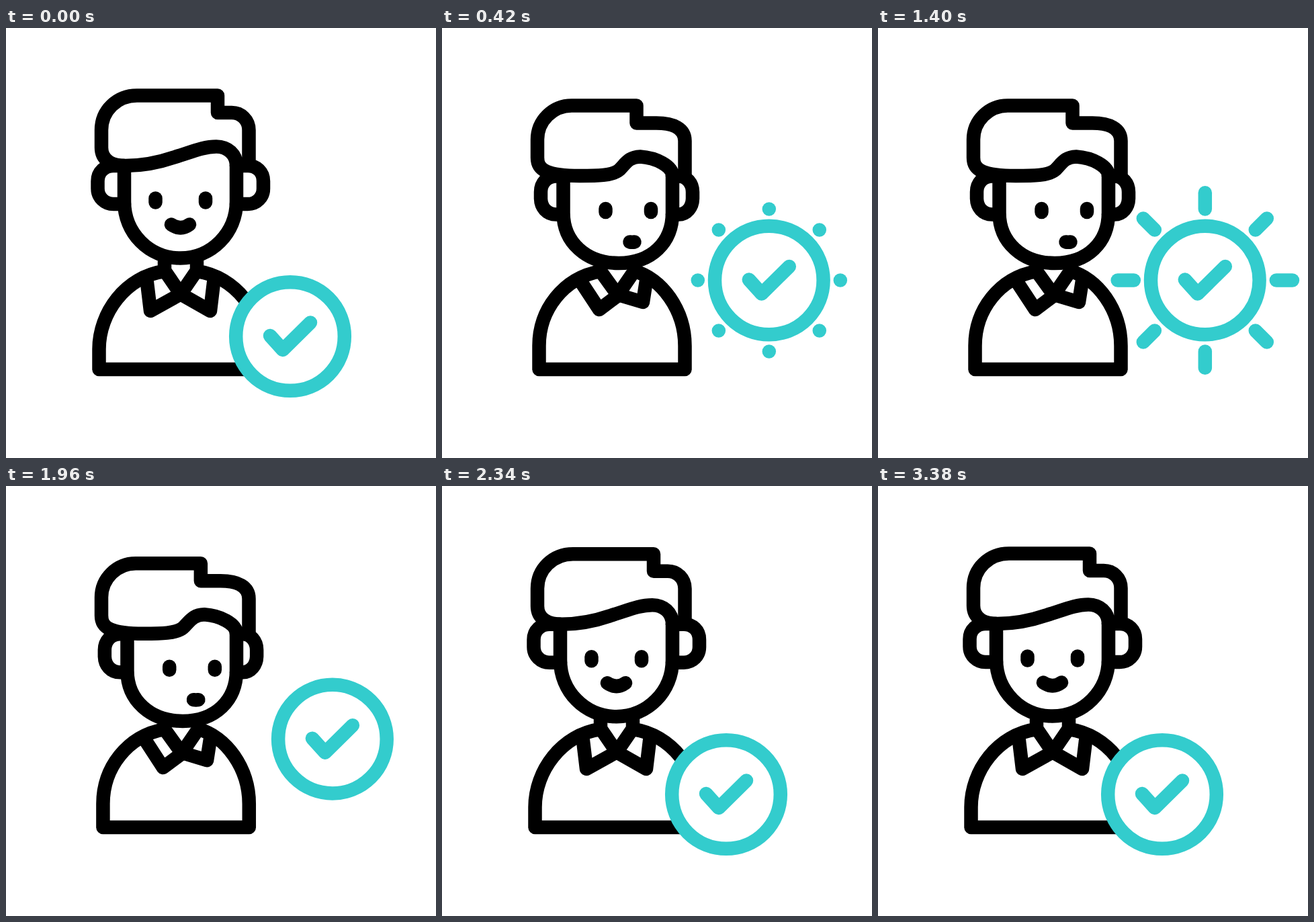
Write an HTML page that moves like this. It is 640 px wide and 640 px high and loops after 3.4 s.

```html
<!DOCTYPE html>
<html lang="en">
<head>
<meta charset="utf-8">
<title>Approved user</title>
<style>
  html, body { margin: 0; height: 100%; overflow: hidden; background: #fff; }
  svg { display: block; width: 100vw; height: 100vh; }
  g { fill: none; stroke-width: 20.5; stroke-linecap: round; stroke-linejoin: round; }
  .person { stroke: #000; }
  .badge { stroke: #33cccd; }
</style>
</head>
<body>
<svg viewBox="0 0 640 640">
  <g class="person"><g id="body"></g><g id="head"></g></g>
  <g class="badge" id="badge">
    <g id="rays"></g>
    <circle r="80.8" fill="#fff"/>
    <path d="M-30-1L-11 20L30-20.5"/>
  </g>
</svg>
<script>
const LOOP = 3400, MOVE = 400, RETURN = 1933;
const BURSTS = [417, 1217], BURST_LENGTH = 600;
const $ = id => document.getElementById(id);

// Each shape: calm pose, surprised pose
const bodyShapes = [
  ['M236 362C178 370 138.5 424 138.5 478V508H381.5V478C381.5 424 342 370 284 362',
   'M236 362C180 372 144.5 420 144.5 473V508H361.5V473C361.5 420 327 372 286 362'],
  ['M236 345V361L260 396L215 421L209 371', 'M236 350V362L262 398L234 419L207 378'],
  ['M284 345V361L260 396L304 421L310 371', 'M286 350V362L262 397L299 408L304 376'],
];
const headShapes = [
  // hair
  ['M361.5 203V152C361.5 137 350 126 336 126H315V100.5H195C165 100.5 142 123 142 152V178C142 195 155 205 178 205C205 205 228 200 250 192.5C275 185 293 176.5 313 176.5C330 176.5 343 188 343 205',
   'M361.5 218V168C361.5 150 345 141.5 319 141.5H289.5V115.5H193C165 115.5 142 138 142 166V193C142 211 155 220 205 220C230 220 254 220 264 211C274 201 278 192 295 191.5C318 193 343 205 343 220'],
  // face
  ['M176 206V258C176 305 213 342.5 259.5 342.5C306 342.5 343 305 343 258V205',
   'M180.5 221V275C180.5 319 215 350 263 350C312 350 343 319 343 275V220'],
  // ears
  ['M176 262H160C147 262 136.5 252 136.5 239V228C136.5 214 147 205 160 205H176',
   'M180 277.5H170C156 277.5 147 267 147 253V244C147 231 156 220.5 170 220.5H180'],
  ['M343 262H360C373 262 383 252 383 239V228C383 214 373 205 360 205H343',
   'M343 277.5H352C364 277.5 373 267 373 253V244C373 231 364 220.5 352 220.5H343'],
  // eyes and mouth
  ['M222.5 253.5V259.5', 'M243.5 269V274'],
  ['M297 253.5V259.5', 'M311 269V274'],
  ['M246 292.5Q260 302 273 292.5', 'M279.5 318.5Q283 319 286.5 318.5'],
];

function addPath(parent) {
  const path = document.createElementNS('http://www.w3.org/2000/svg', 'path');
  return parent.appendChild(path);
}

function build(parent, shapes) {
  return shapes.map(([calm, surprised]) => ({ path: addPath(parent), calm, to: surprised.match(/[\d.]+/g) }));
}

const parts = [...build($('body'), bodyShapes), ...build($('head'), headShapes)];
const rays = Array.from({ length: 8 }, (_, i) => {
  const ray = addPath($('rays'));
  ray.setAttribute('transform', `rotate(${i * 45})`);
  return ray;
});

const lerp = (a, b, k) => a + (b - a) * k;
function ease(t, start, end) {
  const p = Math.min(1, Math.max(0, (t - start) / (end - start)));
  return p * p * (3 - 2 * p);
}

function draw(t) {
  const k = ease(t, 0, MOVE) - ease(t, RETURN, RETURN + MOVE);
  for (const { path, calm, to } of parts) {
    let i = 0;
    path.setAttribute('d', calm.replace(/[\d.]+/g, n => lerp(+n, +to[i++], k).toFixed(2)));
  }
  // The head settles slowly after returning
  const sag = 0.7 * (ease(t, RETURN, RETURN + MOVE) - ease(t, 2700, LOOP));
  $('head').setAttribute('transform', `translate(0 ${sag})`);
  $('badge').setAttribute('transform', `translate(${lerp(423, 486.8, k)} ${lerp(459, 375.5, k)})`);

  const start = BURSTS.find(b => t >= b && t < b + BURST_LENGTH);
  $('rays').style.display = start === undefined ? 'none' : '';
  if (start === undefined) return;
  const tip = -106 - 32 * ease(t, start, start + 272) - 0.01;
  const tail = -106 - 32 * ease(t, start + 230, start + BURST_LENGTH);
  for (const ray of rays) ray.setAttribute('d', `M0 ${tail}V${tip}`);
}

const origin = performance.now();
function tick() {
  draw((performance.now() - origin) % LOOP);
  requestAnimationFrame(tick);
}
tick();
</script>
</body>
</html>
```
